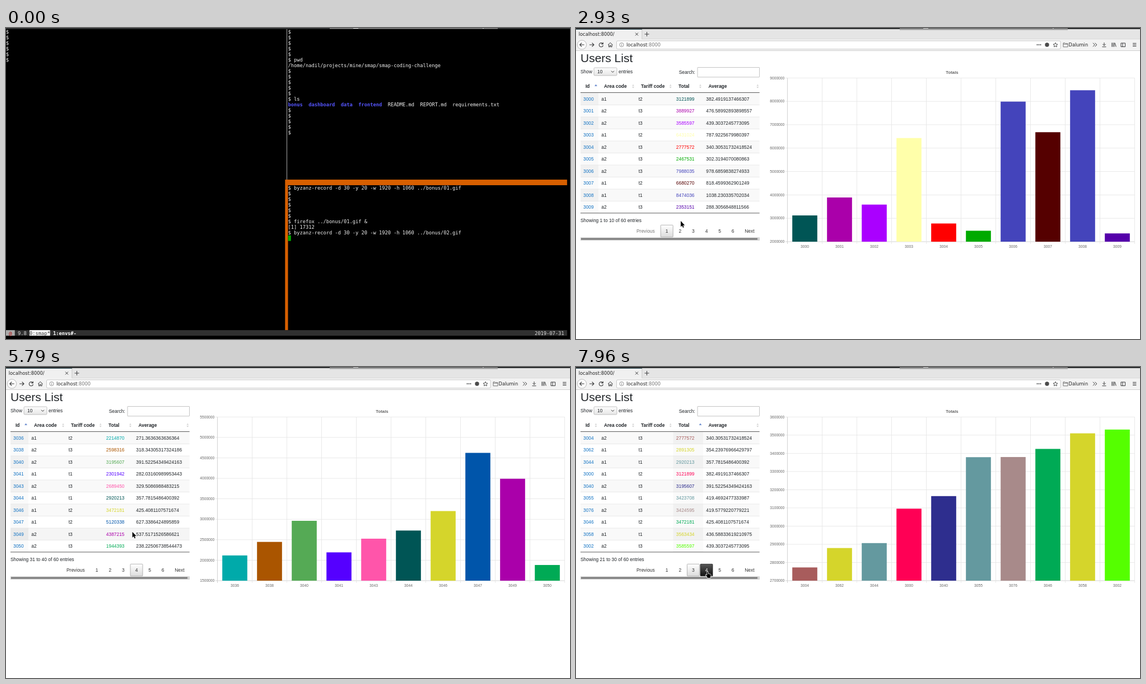
These frames come from a looping animation (1007x556 px, 8 s). An HTML page with a canvas:

```html
<!DOCTYPE html>
<html lang="en">
<head>
<meta charset="utf-8">
<title>Users List</title>
<style>
  html, body { margin: 0; width: 100%; height: 100%; overflow: hidden; background: #000; }
  canvas { display: block; }
</style>
</head>
<body>
<canvas id="stage" width="1007" height="556"></canvas>
<script>
const ctx = document.getElementById('stage').getContext('2d');
const LOOP = 8000, BROWSER_AT = 270, RELOAD_AT = 1350, READY_AT = 1750;
const SANS = '"Liberation Sans", Arial, sans-serif';
const UI = '"DejaVu Sans", sans-serif';
const MONO = '"DejaVu Sans Mono", monospace';
const INK = '#212529';

const users = `3000 a1 t2 3121899
3001 a2 t3 3889927
3002 a2 t3 3585597
3003 a1 t2 6431024
3004 a2 t3 2777572
3005 a2 t3 2467531
3006 a2 t3 7988035
3007 a1 t2 6680270
3008 a1 t1 8474036
3009 a2 t3 2353151
3010 a2 t3 5610213
3011 a1 t2 5296723
3013 a2 t3 4784654
3014 a2 t3 1207581
3015 a2 t3 6074666
3016 a1 t2 2365470
3017 a1 t2 3744108
3018 a2 t3 4120184
3019 a2 t3 1962852
3020 a1 t1 5977058
3023 a1 t2 2158759
3024 a1 t2 4725876
3025 a1 t1 1711107
3026 a2 t3 1112986
3027 a2 t3 2175394
3028 a1 t2 4593486
3029 a1 t1 4960419
3031 a2 t3 2003379
3034 a2 t3 1985401
3035 a1 t1 5686406
3036 a1 t2 2214870
3038 a2 t3 2598316
3040 a2 t3 3195607
3041 a1 t1 2301942
3043 a2 t3 2689450
3044 a1 t1 2920213
3046 a1 t2 3472181
3047 a1 t2 5120338
3049 a2 t3 4387215
3050 a2 t3 1944393
3055 a1 t1 3423708
3058 a1 t1 3563434
3062 a1 t1 2891305
3067 a1 t1 1092765
3069 a1 t1 1118435
3072 a2 t3 1979157
3076 a2 t3 3424595
3078 a2 t3 1431738`.split('\n').map(line => {
  const [id, area, tariff, total] = line.split(' ');
  return { id, area, tariff, total: +total, average: total / 8162 };
});
const byTotal = [...users].sort((a, b) => a.total - b.total);

function makeView(start, page, sorted, colours) {
  const rows = (sorted ? byTotal : users).slice(page * 10 - 10, page * 10);
  colours.split(' ').forEach((c, i) => rows[i] = { ...rows[i], colour: '#' + c });
  return { start, page, sorted, rows, axis: niceAxis(rows.map(r => r.total)) };
}

function niceNum(v) {
  const unit = 10 ** Math.floor(Math.log10(v));
  return [1, 2, 5, 10].find(n => v / unit <= n) * unit;
}

function niceAxis(values) {
  const lo = Math.min(...values), hi = Math.max(...values);
  let step = niceNum((hi - lo) / 10);
  const spaces = Math.ceil(hi / step) - Math.floor(lo / step);
  if (spaces > 10) step = niceNum(spaces * step / 10);
  return { step, min: Math.floor(lo / step) * step, max: Math.ceil(hi / step) * step };
}

const firstColours = '055 a0a a0f ffa f00 0a0 44b 500 44b 50a';
const views = [
  makeView(-2000, 1, false, firstColours),
  makeView(READY_AT, 1, false, firstColours),
  makeView(4123, 2, false, '5a0 50a f0a 64d 05a 05f 505 050 5a0 ffa'),
  makeView(4748, 3, false, '5f0 5a5 05f f55 333 d5d52b 64999f 5f5 0f5 f5a'),
  makeView(5400, 4, false, '0aa a50 5a5 50f f5a 055 d5d52b 05a a0a 0a5'),
  makeView(6533, 1, true, '05f a0a a85c5c 0a0 64999f 5f5 f5a 50f d5d52b a0f'),
  makeView(7040, 2, true, '0a5 f55 05a a0f 5a0 64999f 505 f0a d5d52b 00a'),
  makeView(7460, 3, true, 'a85c5c d5d52b 64999f f05 2e2e8e 64999f a88a8a 0a5 d5d52b 5f0')
];

// time, x, y of the pointer tip
const pointerPath = [
  [0, 382, 510], [1870, 382, 510], [2650, 225, 212], [2930, 187, 345], [3160, 187, 345],
  [3330, 192, 377], [3490, 187, 369], [4220, 187, 369], [4620, 210, 366], [4820, 210, 366],
  [5130, 237, 366], [5500, 237, 366], [6350, 195, 103], [6660, 195, 103], [6960, 187, 366],
  [7100, 187, 366], [7380, 210, 366], [7540, 210, 366], [7860, 235, 366], [8001, 235, 366]
];

function pointerAt(t) {
  const i = pointerPath.findIndex(p => p[0] > t);
  const [t0, x0, y0] = pointerPath[i - 1], [t1, x1, y1] = pointerPath[i];
  const u = (t - t0) / (t1 - t0), e = u * u * (3 - 2 * u);
  return { x: x0 + (x1 - x0) * e, y: y0 + (y1 - y0) * e };
}

function rect(x, y, w, h, fill) {
  ctx.fillStyle = fill;
  ctx.fillRect(x, y, w, h);
}

function text(str, x, y, { size = 8.42, fill = INK, font = SANS, bold = false, align = 'left' } = {}) {
  ctx.font = `${bold ? 'bold ' : ''}${size}px ${font}`;
  ctx.textAlign = align;
  ctx.fillStyle = fill;
  ctx.fillText(str, x, y);
}

function shape(d, { fill, stroke, width = 1 }) {
  const path = new Path2D(d);
  ctx.lineWidth = width;
  if (stroke) { ctx.strokeStyle = stroke; ctx.stroke(path); }
  if (fill) { ctx.fillStyle = fill; ctx.fill(path); }
}

function disc(x, y, r, fill, stroke) {
  ctx.beginPath();
  ctx.arc(x, y, r, 0, 7);
  ctx.lineWidth = .8;
  if (fill) { ctx.fillStyle = fill; ctx.fill(); }
  if (stroke) { ctx.strokeStyle = stroke; ctx.stroke(); }
}

function box(x, y, w, h, top, bottom, border, radius = 1) {
  const g = ctx.createLinearGradient(0, y, 0, y + h);
  g.addColorStop(0, top);
  g.addColorStop(1, bottom);
  ctx.beginPath();
  ctx.roundRect(x, y, w, h, radius);
  ctx.fillStyle = g;
  ctx.fill();
  ctx.strokeStyle = border;
  ctx.lineWidth = .7;
  ctx.stroke();
}

function drawTopEdge() {
  rect(0, 0, 1007, 2, '#2b2d2e');
  rect(578, 0, 300, 1.6, '#858585');
  rect(620, 0, 9, 1, '#eee');
  rect(851, 0, 2, 1, '#ddd');
}

function drawTerminal() {
  const CW = 5.245, LH = 9.966;
  const put = (str, col, row, fill = '#f2f2f2', bold = false) =>
    text(str, col * CW, 10.4 + row * LH, { size: 8.71, font: MONO, fill, bold });
  const cells = (col, row, w, h, fill) => rect(col * CW, 2 + row * LH, w * CW, h * LH, fill);
  const prompts = (col, from, to) => { for (let r = from; r <= to; r++) put('$', col, r); };

  rect(0, 0, 1007, 556, '#000');
  prompts(0, 0, 5);
  prompts(96, 0, 4);
  put('$ pwd', 96, 5);
  put('/home/nadil/projects/mine/smap/smap-coding-challenge', 96, 6);
  prompts(96, 7, 11);
  put('$ ls', 96, 12);
  put('bonus  dashboard  data  frontend', 96, 13, '#5555ff', true);
  put('README.md  REPORT.md  requirements.txt', 130, 13);
  prompts(96, 14, 18);

  rect(501, 2, 1, 269, '#aaa');
  cells(95, 27, 96, 1, '#d75f00');
  cells(95, 28, 1, 26, '#d75f00');
  put('$ byzanz-record -d 30 -y 20 -w 1920 -h 1060 ../bonus/01.gif', 96, 28);
  prompts(96, 29, 33);
  put('$ firefox ../bonus/01.gif &', 96, 34);
  put('[1] 17312', 96, 35);
  put('$ byzanz-record -d 30 -y 20 -w 1920 -h 1060 ../bonus/02.gif', 96, 36);
  cells(96, 37, 1, 1, '#00aa00');

  cells(0, 54, 191, 1, '#303030');
  cells(0, 54, 3, 1, '#aaa');
  cells(8, 54, 7, 1, '#fff');
  put('@', 1, 54, '#b00000');
  put('9.8', 4, 54, '#ddd');
  put('0:smap*', 8, 54, '#303030');
  put('1:envs#-', 16, 54, '#fff', true);
  put('2019-07-31', 180, 54, '#ddd');
}

function drawBrowser(reloadVisible) {
  const icon = '#3a3b3c';
  const ui = { font: UI, size: 8.3, fill: '#222' };
  rect(0, 0, 1007, 556, '#fff');
  rect(0, 2, 1007, 18, '#e5e5e5');
  rect(0, 2, 118, 18, '#f0f0f0');
  rect(0, 2, 118, 1, '#46636b');
  rect(117.5, 3, .7, 17, '#bbb');
  rect(0, 20, 1007, 20.5, '#f3f3f3');
  rect(118, 19.6, 889, .6, '#ccc');
  rect(0, 40.2, 1007, .8, '#c4c4c4');
  const shadow = ctx.createLinearGradient(0, 1, 0, 5);
  shadow.addColorStop(0, 'rgba(0,0,0,.35)');
  shadow.addColorStop(1, 'rgba(0,0,0,0)');
  rect(578, 1, 300, 4, shadow);
  text('localhost:8000/', 4.7, 13.8, ui);
  shape('M106 8.5l5 5m0-5l-5 5M122.5 11h8m-4-4v8', { stroke: icon });

  box(72.5, 23, 792.5, 14.7, '#fff', '#fff', '#b5b5b5', 2);
  disc(10.5, 30, 8.2, '#fbfbfb', '#aaa');
  shape('M14.7 30H7M10.2 26.6L6.8 30L10.2 33.4M24 30h8M28.6 26.6l3.4 3.4l-3.4 3.4', { stroke: icon, width: 1.2 });
  if (reloadVisible) shape('M47.6 27.8A3.6 3.6 0 1 0 48.4 31M48.3 25.8v2.8h-3', { stroke: icon, width: 1.1 });
  shape('M57 30.3l4.3-4l4.3 4M58.5 29.6v4.2h2v-2.6h1.6v2.6h2v-4.2', { stroke: icon });
  disc(81.5, 30, 3.6, null, '#777');
  shape('M81.5 29.5v2.6M81.5 27.8v.9', { stroke: '#777', width: .9 });
  text('localhost', 90, 33, { ...ui, fill: '#222' });
  const hostWidth = ctx.measureText('localhost').width;
  text(':8000', 90 + hostWidth, 33, { ...ui, fill: '#777' });
  for (const x of [823.5, 826.5, 829.5]) disc(x, 30, 1, icon);
  disc(841, 30, 3.7, '#4a4a4a');
  shape('M856 26.2l1.2 2.6l2.8.3l-2.1 1.9l.6 2.8l-2.5-1.4l-2.5 1.4l.6-2.8l-2.1-1.9l2.8-.3z', { stroke: icon, width: .9 });
  shape('M870 26.8h3l1 1h4v6h-8zM870 29h8', { stroke: '#555', width: .8 });
  text('Dalumin', 879.5, 33, ui);
  shape('M923 26.7l3.3 3.3l-3.3 3.3M926.6 26.7l3.3 3.3l-3.3 3.3M943 26v5M940.3 28.8l2.7 2.7l2.7-2.7' +
    'M939.5 33.7h7M956.8 26.3v7.4M958.9 26.3v7.4M961 26.3v7.4M962 26.6l2.3 7' +
    'M973 27h7.6v6.5h-7.6zM976 27v6.5M994 27.4h6.4M994 30h6.4M994 32.6h6.4', { stroke: icon });
  text('Users List', 8, 61.3, { size: 20.98 });
}

function drawRawTable() {
  const heads = { 'Id': 8.5, 'Area code': 16.7, 'Tariff code': 58.8, 'Total': 101.8, 'Average': 122.2 };
  for (const h in heads) text(h, heads[h], 80.2, { bold: true });
}

function drawTable(view, pointer) {
  const inTable = pointer.x > 8 && pointer.x < 327;
  text('Show', 8, 80.8);
  box(32, 71, 41, 14, '#fdfdfd', '#e6e6e6', '#aaa', 1.5);
  text('10', 38, 81);
  shape('M63 76.8l2.5 2.5l2.5-2.5', { stroke: '#333' });
  text('entries', 76, 80.8);
  text('Search:', 183.7, 82.3);
  box(217, 70.5, 110.5, 17.3, '#fff', '#fff', '#aaa', .5);

  const heads = [['Id', 17, 35.5], ['Area code', 50, 102], ['Tariff code', 116, 168.7], ['Total', 183, 222], ['Average', 236.5, 324.3]];
  heads.forEach(([label, x, mark], i) => {
    text(label, x, 107.2, { bold: true });
    if (i === (view.sorted ? 3 : 0)) shape(`M${mark - 2.4} 104l2.4-3.4l2.4 3.4z`, { fill: '#6f8fd0' });
    else shape(`M${mark - 1.9} 103.4l1.9-2.7l1.9 2.7zM${mark - 1.9} 105l1.9 2.7l1.9-2.7z`, { fill: '#d2d2d2' });
  });

  view.rows.forEach((r, i) => {
    const y = 116 + i * 21.5, odd = i % 2 === 0;
    const hover = inTable && pointer.y >= y && pointer.y < y + 21.5;
    rect(8, y, 319.7, 21.5, hover ? '#f5f5f5' : odd ? '#f9f9f9' : '#fff');
    const cell = hover ? '#eaeaea' : odd ? '#f1f1f1' : '#fafafa';
    if (view.sorted) rect(173.5, y, 53.5, 21.5, cell);
    else rect(8, y, 32, 21.5, cell);
    if (i) rect(8, y - .3, 319.7, .6, '#ddd');
    const base = y + 13.7;
    text(r.id, 13, base, { fill: '#1474c4' });
    text(r.area, 45.3, base);
    text(r.tariff, 111.7, base);
    text(r.total, 178.8, base, { fill: r.colour });
    text(r.average, 232.3, base);
  });
  rect(8, 115.2, 319.7, .8, '#333');
  rect(8, 330.5, 319.7, .8, '#333');
  const last = view.page * 10;
  text(`Showing ${last - 9} to ${last} of 60 entries`, 8, 346.7);

  text('Previous', 108, 366.3, { fill: view.page === 1 ? '#777' : '#333' });
  for (let n = 1; n <= 6; n++) {
    const x = 162.2 + (n - 1) * 23.6, current = n === view.page;
    const hover = !current && Math.abs(pointer.x - x) < 11.2 && Math.abs(pointer.y - 363) < 11;
    if (current) box(x - 11, 352.3, 22, 21.5, '#fff', '#dcdcdc', '#979797');
    if (hover) box(x - 11, 352.3, 22, 21.5, '#585858', '#111', '#111');
    text(n, x, 366.3, { align: 'center', fill: hover ? '#fff' : '#333' });
  }
  text('Next', 301.3, 366.3, { fill: '#333' });
  const onBar = inTable && pointer.y > 374.2 && pointer.y < 381;
  rect(8, 374.3, 320, 5.7, '#d2d2d2');
  rect(9, 375.6, 315, 3, onBar ? '#555' : '#7c7c7c');
}

function drawChart(view, t) {
  const left = 377.5, top = 89.3, bottom = 382, cat = 62, right = left + 10 * cat;
  const { min, max, step } = view.axis;
  const u = Math.min(1, Math.max(0, (t - view.start) / 1000));
  const grow = 1 - (1 - u) ** 4;
  const label = { size: 6.65, fill: '#666' };
  text('Totals', 671.5, 81.8, { size: 7.8, bold: true, fill: '#666', align: 'center' });
  const lines = Math.round((max - min) / step);
  for (let i = 0; i <= lines; i++) {
    const y = bottom - (bottom - top) * i / lines;
    rect(373.5, y - .4, right - 373.5, .8, i ? '#e4e4e4' : '#c8c8c8');
    text(Math.round(min + i * step), 372.2, y + 2.2, { ...label, align: 'right' });
  }
  for (let i = 0; i <= 10; i++) rect(left + i * cat - .4, top, .8, bottom - top + 4, i ? '#e4e4e4' : '#c8c8c8');
  view.rows.forEach((r, i) => {
    const h = (r.total - min) / (max - min) * (bottom - top) * grow;
    rect(left + (i + .14) * cat, bottom - h, cat * .72, h, r.colour);
    text(r.id, left + (i + .5) * cat, 392.8, { ...label, align: 'center' });
  });
}

function drawPointer({ x, y }, loaded) {
  const onButton = y > 352 && y < 374.2 && x > 105 && x < 322;
  const onHead = y > 94 && y < 115 && x < 327;
  ctx.save();
  ctx.translate(x, y);
  ctx.lineJoin = 'round';
  const d = loaded && (onButton || onHead)
    ? 'M-.8 .6Q0-.4 .8 .6V4L4.6 4.6Q6 5 5.8 6.6L5 9.3V11H-.6V9.6L-3.4 6.3Q-3.6 5-2.2 5.4L-.8 6.6Z'
    : 'M0 0V10.4L2.4 8.2L4 11.9L5.6 11.2L4.1 7.7H7.2Z';
  shape(d, { fill: '#000', stroke: '#fff', width: 1.5 });
  ctx.restore();
}

function draw(t) {
  if (t < BROWSER_AT) {
    drawTerminal();
  } else {
    const pointer = pointerAt(t);
    const loaded = t < RELOAD_AT || t >= READY_AT;
    drawBrowser(t < RELOAD_AT || t > 1950);
    if (loaded) {
      const view = views.findLast(v => v.start <= t);
      drawTable(view, pointer);
      drawChart(view, t);
    } else {
      drawRawTable();
    }
    drawPointer(pointer, loaded);
  }
  drawTopEdge();
}

function tick() {
  draw(performance.now() % LOOP);
  requestAnimationFrame(tick);
}
tick();
</script>
</body>
</html>
```
